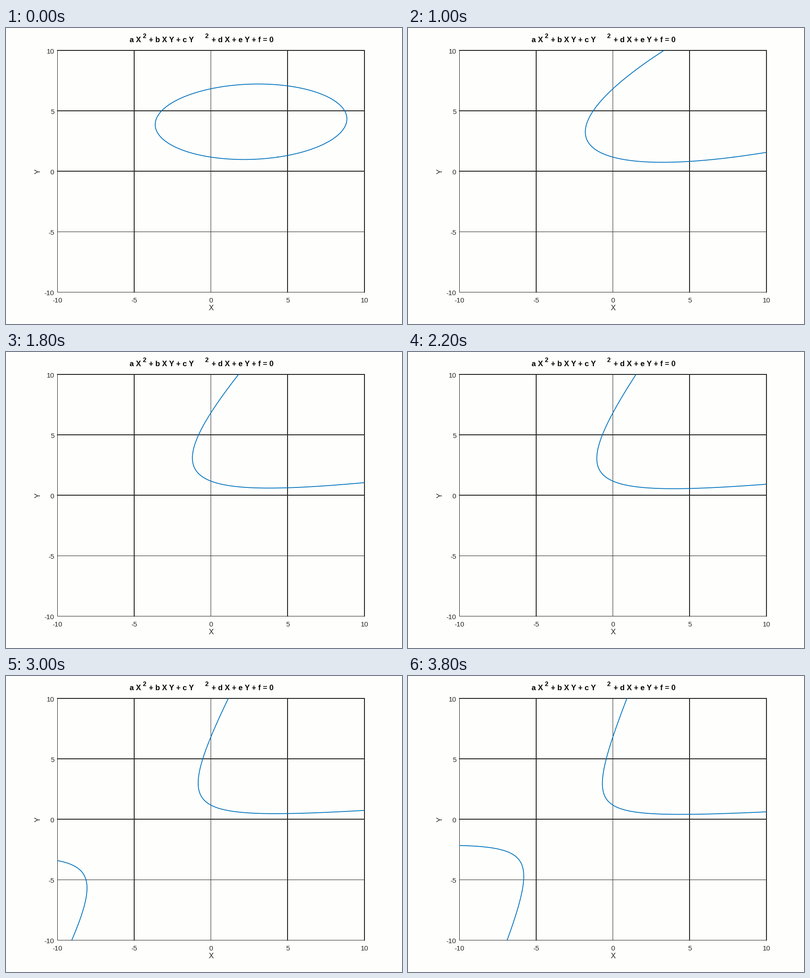
Recreate the animation shown at these times as a matplotlib script. Size 865 px wide and 647 px high, loop 3.9 s.

```python
import numpy as np
import matplotlib.pyplot as plt
from matplotlib.animation import FuncAnimation
from matplotlib.patches import Rectangle

W, H, DPI = 865, 647, 100
FRAMES, INTERVAL = 39, 100
PT = 72 / DPI                      # points per pixel
CX, CY, SX, SY = 447.64, 313.2, 33.52, 26.42
INK, BLUE, PAPER = "#262626", "#0072bd", "#fefffd"

# Conic A x^2 + b x y + y^2 + D x + E y + F = 0; only b varies
A, D, E, F = 0.25, -1.0, -8.0, 8.0
STEP = 0.075
SKIP = 16                          # b jumps a double step here

plt.rcParams["font.family"] = "Liberation Sans"
fig = plt.figure(figsize=(W / 100, H / 100), dpi=DPI, facecolor=PAPER)
ax = fig.add_axes([0, 0, 1, 1])
ax.set_xlim(0, W)
ax.set_ylim(H, 0)
ax.axis("off")


def to_px(x, y):
    return CX + SX * x, CY - SY * y


def snap(c):
    """Hard-edged line: two pixels near a pixel border, else one."""
    if abs(c - round(c)) <= 0.25:
        return round(c), 2
    return np.floor(c) + 0.5, 1


def line(xs, ys, width):
    ax.plot(xs, ys, color=INK, lw=width * PT, solid_capstyle="projecting",
            snap=False, zorder=1)


def label(x, y, s, size, ha="center", color=INK, **kw):
    ax.text(x, y, s, fontsize=size * PT, ha=ha, va="baseline", color=color, **kw)


left, top = to_px(-10, 10)
right, bottom = to_px(10, -10)

for v in range(-10, 11, 5):
    x, y = to_px(v, v)
    sx, wx = snap(x)
    sy, wy = snap(y)
    line([sx, sx], [top, bottom], wx)
    line([left, right], [sy, sy], wy)
    label(x, 599.5, str(v), 15)
    label(105.3, y + 7, str(v), 15, ha="right")

label(CX, 617, "X", 16.5)
label(75, CY, "Y", 16.5, rotation=90, rotation_mode="anchor")

for x, y, s, size in [(270.5, 31, "a X", 16.5),
                      (298.6, 22, "2", 13.8),
                      (312.5, 31, "+ b X Y + c Y", 16.5),
                      (434.8, 22, "2", 13.8),
                      (449.3, 31, "+ d X + e Y + f = 0", 16.5)]:
    label(x, y, s, size, ha="left", color="black", weight="bold")

curve, = ax.plot([], [], color=BLUE, lw=1.75 * PT, zorder=2)
box = Rectangle((left, top), right - left, bottom - top,
                transform=ax.transData, fill=False, lw=0)
curve.set_clip_path(box)

theta = np.linspace(0, np.pi, 6001)
U, V = np.cos(theta), np.sin(theta)
Y0 = (-E - np.sqrt(E**2 - 4 * F)) / 2   # every conic passes through (0, Y0)


def conic(b):
    """Trace the conic with a pencil of lines through (0, Y0)."""
    slope = (b * Y0 + D) * U + (2 * Y0 + E) * V
    quad = A * U**2 + b * U * V + V**2
    with np.errstate(divide="ignore", invalid="ignore"):
        r = -slope / quad
    r[~(np.abs(r) < 60)] = np.nan
    return r * U, Y0 + r * V


def draw(n):
    k = n + 1 + (n >= SKIP)
    curve.set_data(*to_px(*conic(-STEP * k)))
    return curve,


anim = FuncAnimation(fig, draw, frames=FRAMES, interval=INTERVAL,
                     repeat=True, repeat_delay=0, blit=False)
plt.show()
```
